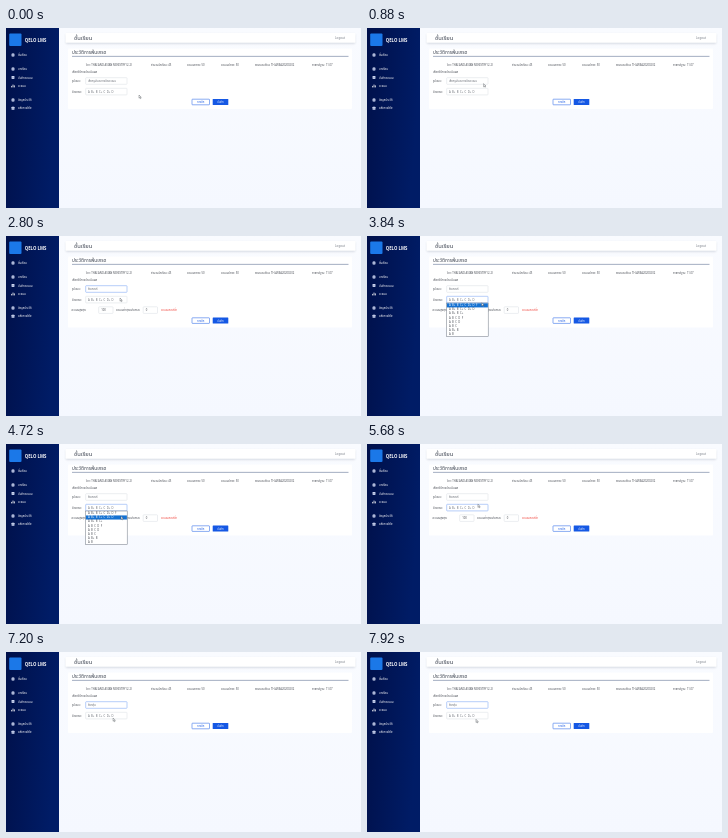
These frames come from a looping animation (355x180 px, 8000 ms). An HTML page:

```html
<!DOCTYPE html>
<html>
<head>
<meta charset="utf-8">
<title>Grading form</title>
<style>
  html, body { margin: 0; width: 100%; height: 100%; overflow: hidden; background: #f8faff; }
  svg { display: block; width: 355px; height: 180px; }
  text { font-family: "Noto Sans Thai", "Noto Sans", sans-serif; white-space: pre; }
</style>
</head>
<body>
<svg id="stage" viewBox="0 0 355 180" xmlns="http://www.w3.org/2000/svg">
  <defs>
    <linearGradient id="navy" x1="0" y1="0" x2="1" y2="0.25">
      <stop offset="0" stop-color="#00104a"/>
      <stop offset="1" stop-color="#001c66"/>
    </linearGradient>
    <linearGradient id="page" x1="0" y1="0" x2="0" y2="1">
      <stop offset="0" stop-color="#f9fbff"/>
      <stop offset="1" stop-color="#f5f8ff"/>
    </linearGradient>
    <filter id="soft" x="-5%" y="-50%" width="110%" height="200%">
      <feGaussianBlur stdDeviation="1"/>
    </filter>
  </defs>
</svg>
<script>
const LOOP = 8000, STEP = 80;
const BLUE = '#1558e4', INK = '#4c5058', EDGE = '#d9dce2';
const GRADES = 'A  B+  B  C+  C  D+  D';
const METHODS = ['เลือกรูปแบบการคิดคะแนน', 'อิงเกณฑ์', 'อิงกลุ่ม'];
const SCALES = [GRADES + '  F', GRADES, 'A  B+  B  C+', 'A  B  C  D  F', 'A  B  C  D', 'A  B  C', 'A  B+  B', 'A  B'];
const stage = document.getElementById('stage');

function add(tag, attrs, parent = stage, content = '') {
  const node = document.createElementNS('http://www.w3.org/2000/svg', tag);
  for (const key in attrs) node.setAttribute(key, attrs[key]);
  node.textContent = content;
  parent.appendChild(node);
  return node;
}
const group = () => add('g', {});
const box = (x, y, width, height, fill, parent, extra) =>
  add('rect', { x, y, width, height, fill, ...extra }, parent);
const label = (x, y, size, content, fill = INK, parent, extra) =>
  add('text', { x, y, 'font-size': size, fill, ...extra }, parent, content);
const field = (x, y, width, parent) =>
  box(x, y, width, 6.6, '#fff', parent, { stroke: EDGE, 'stroke-width': 0.5, rx: 0.6 });
const show = (node, on) => node.setAttribute('visibility', on ? 'visible' : 'hidden');

// Sidebar
box(0, 0, 355, 180, 'url(#page)');
box(0, 0, 53, 180, 'url(#navy)');
box(3.2, 5.5, 12.3, 12.5, '#1b78e8', stage, { rx: 1 });
label(18.8, 13.5, 4.3, 'QELO LMS', '#fff', stage, { 'font-weight': 700 });
[[27, 'ชั้นเรียน'], [41, 'บทเรียน'], [49.5, 'บันทึกคะแนน'], [58, 'คะแนน'],
 [72, 'ข้อมูลประวัติ'], [80.3, 'คลังการวิจัย']].forEach(([y, name], i) => {
  if (i === 3) {
    add('path', { d: `M5.6 ${y + 1.4}v-1.5M7 ${y + 1.4}v-2.8M8.4 ${y + 1.4}v-2`, stroke: '#fff', 'stroke-width': 0.8 });
  } else {
    box(5.6, y - 1.5, 2.8, 3, '#e4ebff', stage, { rx: 0.4 });
    add('path', { d: `M6.2 ${y - 0.4}h1.6m-1.6 1h1.6`, stroke: '#0b2268', 'stroke-width': 0.35 });
  }
  label(12, y + 1, 2.8, name, '#fff', stage, { 'font-weight': 500 });
});

// Top bar
box(60, 6.5, 289, 9, '#b9c0cc', stage, { filter: 'url(#soft)', opacity: 0.7 });
box(59.5, 5, 290, 9.8, '#fff', stage, { rx: 0.8 });
label(68, 11.9, 5.8, 'ชั้นเรียน', '#3c4350');
label(329, 11.3, 3, 'Logout', '#7a7f88');

// Form card
const card = box(62, 20.5, 284, 60.5, '#fff', stage, { rx: 0.8 });
label(66, 26.4, 4.7, 'ประวัติการพ้นเกรด', '#3c4350');
box(66, 27.9, 276.5, 0.7, '#7d8ba8');
[[80, 'วิชา: THAI AND ASIAN MINISTRY (2-2)'], [145, 'จำนวนนักเรียน: 45'], [181, 'คะแนนกลาง: 50'],
 [215, 'คะแนนปลาย: 50'], [249, 'รอบแบบเรียน: TH-AREA20200202'], [306, 'อาจารย์ฐาน: 11.07']]
  .forEach(([x, text]) => label(x, 37.6, 2.7, text));
label(66, 45, 2.9, 'เลือกวิธีการประเมินผล');
label(66, 53.9, 2.8, 'รูปแบบ:');
label(66, 64.5, 2.8, 'คิดเกรด:');
const methodBox = field(79.7, 49.7, 41.3);
const method = label(82, 54, 2.7, '', '#666b73');
const scaleBox = field(79.7, 60.3, 41.3);
label(82, 64.6, 2.7, GRADES, '#666b73');

const extra = group();
label(65.5, 75, 2.8, 'คะแนนสูงสุด:', INK, extra);
field(92.7, 70.8, 14.3, extra);
label(95.2, 75, 2.7, '100', INK, extra);
label(110, 75, 2.7, 'คะแนนต่ำสุดแบ่งเกรด:', INK, extra);
field(137.2, 70.8, 14.3, extra);
label(139.8, 75, 2.7, '0', INK, extra);
label(155, 75, 2.6, 'คะแนนเกณฑ์ต่ำ', '#f0443c', extra);

const buttons = group();
box(186, 71.2, 17.5, 5.6, '#fff', buttons, { stroke: BLUE, 'stroke-width': 0.5, rx: 0.5 });
box(206.7, 71, 15.6, 6, BLUE, buttons, { rx: 0.5 });
const centred = { 'text-anchor': 'middle', 'font-weight': 500 };
label(194.8, 75, 2.6, 'ยกเลิก', BLUE, buttons, centred);
label(214.5, 75, 2.6, 'บันทึก', '#fff', buttons, centred);

function makeList(top, items, row) {
  const node = group();
  box(79.6, top, 41.6, items.length * row + 0.6, '#fff', node, { stroke: '#6d7580', 'stroke-width': 0.5 });
  const bar = box(79.9, top, 41, row, '#1672d2', node);
  const texts = items.map((item, i) => label(82, top + i * row + 3.2, 2.7, item, INK, node));
  return (open, picked) => {
    show(node, open);
    bar.setAttribute('y', top + 0.3 + picked * row);
    texts.forEach((text, i) => text.setAttribute('fill', i === picked ? '#fff' : INK));
  };
}
const methodList = makeList(56.3, METHODS, 4.15);
const scaleList = makeList(67, SCALES, 4.12);

const pointer = add('path', {
  d: 'M0 0V3.2L0.8 2.5L1.4 3.7L1.9 3.4L1.4 2.3H2.3Z',
  fill: '#fff', stroke: '#33373d', 'stroke-width': 0.35
});

// Pointer stops: time, x, y
const path = [
  [0, 133, 67], [640, 133, 67], [960, 113.5, 53.5], [1520, 114, 53.5], [1920, 113, 59.5],
  [2160, 109, 62], [2240, 109, 62], [2800, 114, 62], [3440, 114, 62], [4080, 115, 69],
  [4560, 115, 72.3], [5280, 115, 72.3], [6000, 108, 51.5], [6560, 108, 51.5],
  [6960, 107, 66], [7120, 107, 66], [7760, 109, 67.3], [LOOP, 109, 67.3]
];
// Values in force from each time on
const methodHover = [[0, 0], [2080, 1], [6720, 2]];
const scaleHover = [[0, 0], [4320, 1]];
const methodValue = [[0, 0], [2240, 1], [7040, 2]];
const focus = [[0, ''], [1520, 'method'], [3440, 'scale'], [6160, 'method']];

const at = (steps, t) => steps.filter(step => step[0] <= t).pop()[1];
const within = (t, from, to) => t >= from && t < to;

function position(t) {
  const i = path.findIndex(stop => stop[0] > t);
  const [t0, x0, y0] = path[i - 1], [t1, x1, y1] = path[i];
  const p = (t - t0) / (t1 - t0), k = p * p * (3 - 2 * p);
  return [x0 + (x1 - x0) * k, y0 + (y1 - y0) * k];
}

function draw(t) {
  const wide = within(t, 2240, 7040), focused = at(focus, t);
  card.setAttribute('height', wide ? 71 : 60.5);
  buttons.setAttribute('transform', `translate(0 ${wide ? 10.6 : 0})`);
  show(extra, wide);
  method.textContent = METHODS[at(methodValue, t)];
  methodBox.setAttribute('stroke', focused === 'method' ? '#6f9df2' : EDGE);
  scaleBox.setAttribute('stroke', focused === 'scale' ? '#6f9df2' : EDGE);
  methodList(within(t, 1520, 2240) || within(t, 6160, 7040), at(methodHover, t));
  scaleList(within(t, 3440, 5040), at(scaleHover, t));
  pointer.setAttribute('transform', `translate(${position(t)})`);
}

const start = performance.now();
function tick() {
  const t = (performance.now() - start) % LOOP;
  draw(Math.floor(t / STEP) * STEP);
  requestAnimationFrame(tick);
}
tick();
</script>
</body>
</html>
```
